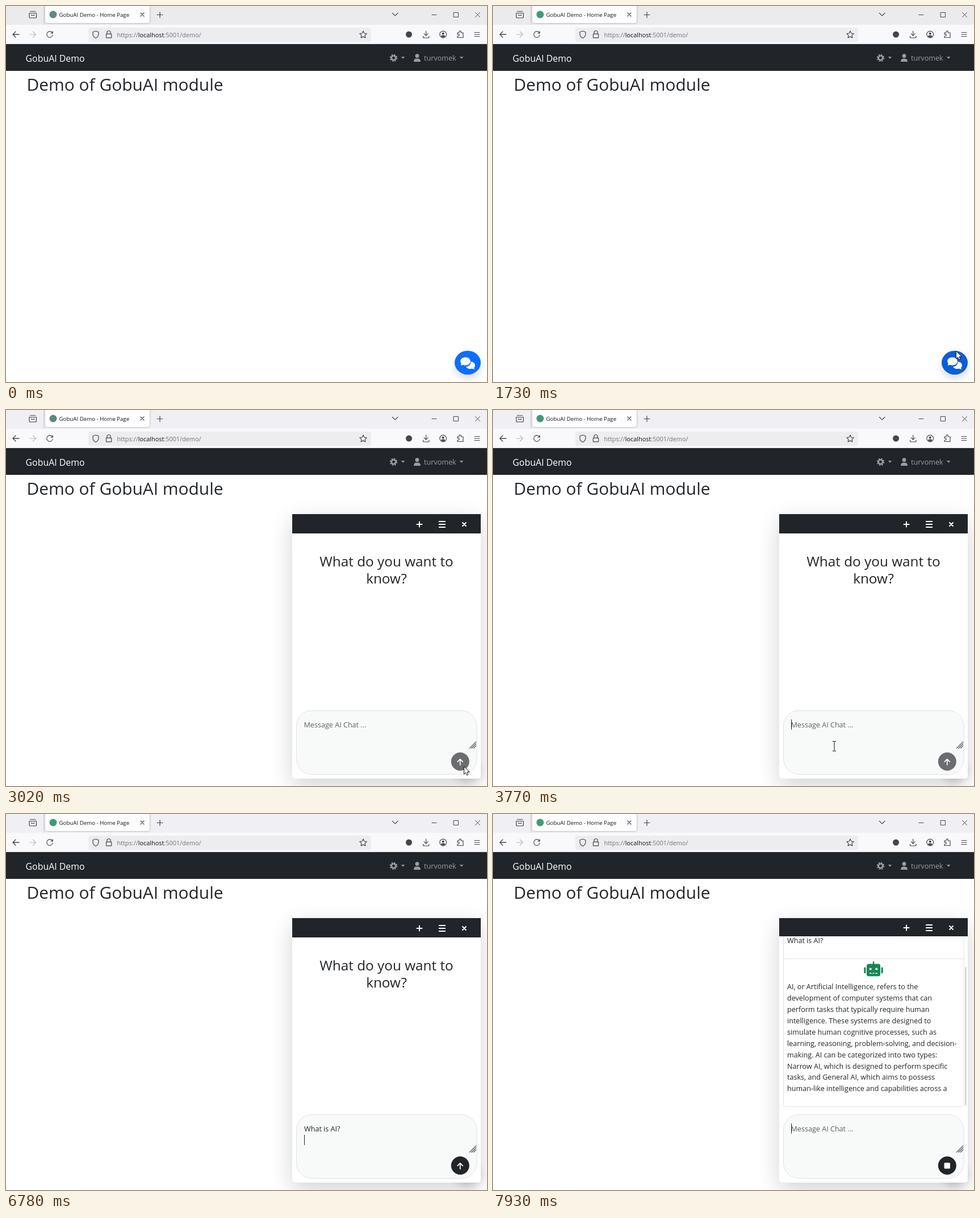
Write an HTML page that moves like this. It is 847 px wide and 661 px high and loops after 8 s.

```html
<!DOCTYPE html>
<html lang="en">
<head>
<meta charset="utf-8">
<title>GobuAI Demo - Home Page</title>
<style>
html, body { margin: 0; width: 100%; height: 100%; overflow: hidden; background: #fff; }
#stage { position: absolute; inset: 0; overflow: hidden; font-family: "Open Sans", "Noto Sans", sans-serif; }
#stage > * { position: absolute; }
svg { display: block; }
#art { left: 0; top: 0; }
.strip { left: 0; top: 0; width: 847px; height: 33px; background: #ebebee; animation: strip 8s step-end infinite; }
.tab { left: 69px; top: -4px; width: 184px; height: 34px; border-radius: 4px; background: #fdfdfe; box-shadow: 0 0 3px rgba(0,0,0,.4); }
.tools { left: 0; top: 33px; width: 847px; height: 34px; background: #f9f9fb; }
.address { left: 145px; top: 38px; width: 498px; height: 25px; border-radius: 4px; background: #ededf0; }
.nav { left: 0; top: 67px; width: 847px; height: 47px; background: #212529; }
.fab { left: 790px; top: 606px; width: 46px; height: 42px; border-radius: 50%; background: #0d6efd;
  box-shadow: 0 7px 13px rgba(0,0,0,.15); animation: fab 8s linear infinite; }
.panel { left: 504px; top: 183px; width: 332px; height: 465px; border-radius: 0 0 5px 5px; background: #fff;
  box-shadow: 0 13px 40px rgba(0,0,0,.175); }
.panel, #chatbox { animation: open 8s step-end infinite; }
.ink { fill: none; stroke: #45454e; stroke-width: 1.2; stroke-linecap: round; stroke-linejoin: round; }
.mute { fill: #9b9d9f; }
.dark { fill: #212529; }
.body { font-size: 12.6px; }
#icon { fill: #3f9a78; animation: icon 8s step-end infinite; }
#pointer { animation: path 8s linear infinite; }
#arrow { animation: arrow 8s step-end infinite; }
#beam { animation: beam 8s step-end infinite; }
#typed { white-space: pre; }

@keyframes strip { 0% { background: #ebebee } 36% { background: #f0f0f4 } }
@keyframes icon { 0%, 36% { fill: #5f8784 } .875%, 38.625% { fill: #3f9a78 } }
@keyframes open { 0% { visibility: hidden } 36% { visibility: visible } }
@keyframes fab {
  0%, 17%, 26%, 27% { background: #0d6efd }
  19%, 24%, 29%, 99.9% { background: #0b5ed7 }
}
@keyframes path {
  0%, 12.2% { transform: translate(862px, 638px) }
  12.25% { transform: translate(845px, 637px) }
  16.5% { transform: translate(828px, 629px) }
  21.625%, 22.4% { transform: translate(815px, 606px) }
  24.4% { transform: translate(790px, 637px) }
  26.2% { transform: translate(747px, 643px) }
  27.4% { transform: translate(768px, 640px) }
  29.375%, 42.4% { transform: translate(806px, 626px) }
  43.75% { transform: translate(748px, 616px) }
  45.4% { transform: translate(650px, 597px) }
  47.125%, 48.8% { transform: translate(601px, 591px) }
  48.875%, 100% { transform: translate(613px, 590px) }
}
@keyframes arrow { 0% { visibility: visible } 42.875% { visibility: hidden } }
@keyframes beam { 0% { visibility: hidden } 42.875% { visibility: visible } 49.625% { visibility: hidden } }
</style>
</head>
<body>
<div id="stage">
  <div class="strip"></div>
  <div class="tab"></div>
  <div class="tools"></div>
  <div class="address"></div>
  <div class="nav"></div>
  <div class="fab">
    <svg width="46" height="42" viewBox="790 606 46 42" fill="#fff">
      <path d="M826 631.5c0 2-.8 3.6-2 4.9.4 1 1.2 1.6 1.9 2.1-1.8.2-3.7-.2-5.2-1-4.5 1.3-9-.2-10.7-3.3 5.2-.6 8.8-4.2 8.6-9 4.4.4 7.4 3.1 7.4 6.3Z"/>
      <path d="M809 617.500c5 0 8.900 3.100 8.900 7.100s-3.900 7.100-8.900 7.100c-1.700 0-3.200-.3-4.500-.9-1.300.7-2.800 1-4.300.9.9-.8 1.500-1.700 1.700-2.800-1.100-1.200-1.800-2.700-1.800-4.300 0-4 3.900-7.100 8.900-7.100Z"/>
    </svg>
  </div>
  <div class="panel"></div>

  <svg id="art" width="847" height="661" viewBox="0 0 847 661">
    <!-- browser window -->
    <path d="M66.500 0V33" stroke="#cbcbd2"/>
    <path d="M0 66.500H847" stroke="#e2e2e6"/>
    <g class="ink">
      <path d="M42.500 9.500H52M41 12.500H53.500V19q0 2-2 2H43q-2 0-2-2ZM45 15v1.500h4.500V15"/>
      <path d="M237 12l6 6m0-6l-6 6M266 15.500h10M271 10.500v10M680.500 12.500l4.700 4.700 4.700-4.700"/>
      <path d="M750 15.500h8M788.500 11.500h8v8h-8ZM826.500 11.500l8 8m0-8l-8 8" stroke-width="1"/>
      <path d="M23 50H12m5-5l-5 5 5 5" stroke-width="1.400"/>
      <path d="M41.500 50h11m-5-5l5 5-5 5" stroke="#b9b9c0"/>
      <path d="M81.600 47.200A5.300 5.300 0 1 0 82.300 51M82.300 44.500v3.500h-3.500"/>
      <path d="M158 44l5 1.800v3.700q0 4.500-5 7-5-2.500-5-7v-3.700Z"/>
      <path d="M178 49v-2.500a3 3 0 0 1 6 0V49M176.500 49.200h9.200v6.600h-9.200Z"/>
      <path d="M629 44l1.900 4 4.300.6-3.100 3 .7 4.300-3.800-2-3.800 2 .7-4.300-3.100-3 4.300-.6Z"/>
      <path d="M739.700 44v8m-3.500-3.300l3.500 3.500 3.500-3.500M734.500 53v1q0 2 2 2h6.500q2 0 2-2v-1"/>
      <circle cx="769.700" cy="50" r="5.900"/>
      <path d="M795 47h3v-1.500a1.700 1.700 0 0 1 3.400 0V47h3.600v8.500h-10V53h1.500a1.700 1.700 0 0 0 0-3.400H795Z"/>
      <path d="M825 46.500h9m-9 3.500h9m-9 3.500h9"/>
    </g>
    <circle cx="709.500" cy="50" r="5.500" fill="#45454e"/>
    <circle cx="769.700" cy="48.500" r="2" fill="#45454e"/>
    <path d="M766 53.500q0-2 2-2h3.400q2 0 2 2-3.700 3-7.400 0Z" fill="#45454e"/>
    <circle id="icon" cx="83" cy="15" r="6.500"/>
    <text x="93.500" y="19" font-size="9.700" fill="#15141a">GobuAI Demo - Home Page</text>
    <text x="195.500" y="54.500" font-size="10.900" fill="#737379">https://<tspan fill="#15141a">localhost</tspan>:5001/demo/</text>

    <!-- page -->
    <text x="34.500" y="98" font-size="15.900" fill="#fff">GobuAI Demo</text>
    <g fill="none" stroke="#9b9d9f">
      <circle cx="682.500" cy="91.300" r="3.700" stroke-width="2.500"/>
      <circle cx="682.500" cy="91.300" r="5.700" stroke-width="2" stroke-dasharray="2.400 2.077"/>
    </g>
    <g class="mute">
      <path d="M695.700 89.300h6.600l-3.300 3.500ZM798.800 89.300h6.600l-3.300 3.500Z"/>
      <circle cx="724" cy="87.700" r="3.400"/>
      <path d="M718 98q0-5.500 4.500-5.500h3q4.500 0 4.500 5.500Z"/>
      <text class="body" x="736" y="96">turvomek</text>
    </g>
    <text class="dark" x="36.500" y="149" font-size="29.850">Demo of GobuAI module</text>

    <!-- chat panel -->
    <g id="chatbox">
      <g id="hello" class="dark" font-size="24.300" text-anchor="middle">
        <text x="670" y="275">What do you want to</text>
        <text x="670" y="305">know?</text>
      </g>
      <svg x="504" y="183" width="332" height="340" viewBox="504 183 332 340">
        <g id="talk">
          <rect id="card" x="511.500" y="223.500" width="317.500" rx="4" fill="#fff" stroke="#dee2e6"/>
          <g fill="#0d6efd">
            <circle cx="656" cy="233.700" r="6.700"/>
            <path d="M644 252.500q0-9 9.300-9h5.400q9.300 0 9.300 9 0 1.500-1.500 1.500h-21q-1.500 0-1.500-1.500Z"/>
          </g>
          <path d="M811 230h5.500l3 3v8q0 1.300-1.300 1.300H811q-1.300 0-1.300-1.300v-9.700q0-1.300 1.300-1.300Z" fill="#6c757d"/>
          <path d="M808.300 235h-2.600v10.200h8.600v-1.700" fill="none" stroke="#6c757d" stroke-width="1.800"/>
          <text class="body dark" x="518" y="276">What is AI?</text>
          <g id="bot">
            <path d="M511.500 303.500H829" stroke="#dee2e6"/>
            <g fill="#198754">
              <rect x="658" y="312.500" width="24" height="21.700" rx="3.500"/>
              <rect x="668.800" y="308" width="2.400" height="6" rx="1"/>
              <rect x="653.300" y="318.500" width="3.200" height="10.500" rx="1.200"/>
              <rect x="683.500" y="318.500" width="3.200" height="10.500" rx="1.200"/>
            </g>
            <circle cx="664.700" cy="321.500" r="2.100" fill="#fff"/>
            <circle cx="675.300" cy="321.500" r="2.100" fill="#fff"/>
            <path d="M663.200 329h3.300m2 0h3m2 0h3.300" stroke="#fff" stroke-width="1.600"/>
          </g>
          <g id="lines" class="body dark"></g>
        </g>
      </svg>
      <rect id="bar" x="831.500" y="269" width="2" height="243" rx="1" fill="#c4c6c8"/>
      <rect id="head" class="dark" x="504" y="183" width="332"/>
      <path id="tools" d="M728 195.700v10.600M722.700 201h10.600M762 196h12m-12 5h12m-12 5h12M803.500 197.500l7 7m0-7l-7 7" stroke="#fff" stroke-width="2"/>
      <rect x="511.500" y="528.500" width="317.500" height="112" rx="27" fill="#f8faf9" stroke="#dee2e6"/>
      <path d="M816 595l12-12m-8.500 12l8.500-8.500m-5 8.500l5-5" stroke="#4c5053" stroke-width="1.100"/>
      <text id="hint" class="body" x="524.500" y="558" fill="#5c6164">Message AI Chat ...</text>
      <text id="typed" class="body dark" x="525" y="558"></text>
      <rect id="caret" class="dark" width="1" height="18"/>
      <circle id="send" cx="799.800" cy="618" r="16"/>
      <path id="up" d="M799.700 624v-10m-4.500 4.300l4.500-4.500 4.500 4.500" fill="none" stroke="#fff" stroke-width="1.700" stroke-linecap="round" stroke-linejoin="round"/>
      <rect id="stop" x="794.500" y="613" width="10.400" height="10.400" rx="1.500" fill="#fff"/>
    </g>

    <g id="pointer">
      <path id="arrow" d="M.5.500V14.300L3.600 11.400 5.700 16 8 15 6 10.500H10.300Z" fill="#fff" stroke="#111"/>
      <path id="beam" d="M-3-8.500h2.500L0-8 .5-8.500H3M0-8V8M-3 8.500h2.500L0 8l.5.500H3" fill="none" stroke="#111"/>
    </g>
  </svg>
</div>
<script>
const LOOP = 8000, SENT = 6910;
const $ = id => document.getElementById(id);
const show = (id, on) => { $(id).style.display = on ? '' : 'none'; };
const within = (t, spans) => spans.some(([a, b]) => t >= a && t < b);

const question = 'What is AI?';
const keyTimes = [4830, 5030, 5160, 5300, 5630, 5700, 5830, 5900, 6050, 6120, 6380, 6780];
const caretX = [525, 537, 545, 552, 556, 560, 563, 568, 572, 580, 584, 590, 525];
const caretOn = [[3770, 4310], [4830, 5360], [5630, 6450], [6780, LOOP]];

const answer = [
  'AI, or Artificial Intelligence, refers to the',
  'development of computer systems that can',
  'perform tasks that typically require human',
  'intelligence. These systems are designed to',
  'simulate human cognitive processes, such as',
  'learning, reasoning, problem-solving, and decision-',
  'making. AI can be categorized into two types:',
  'Narrow AI, which is designed to perform specific',
  'tasks, and General AI, which aims to possess',
  'human-like intelligence and capabilities across a'
].map(line => line.split(' '));

// [time, words received so far]
const stream = [[7050, 1], [7120, 4], [7190, 7], [7250, 10], [7310, 13], [7380, 15],
  [7460, 17], [7540, 19], [7600, 31], [7660, 43], [7860, 52], [7930, 67]];

const rows = answer.map((_, i) => {
  const row = document.createElementNS('http://www.w3.org/2000/svg', 'text');
  row.setAttribute('x', 518);
  row.setAttribute('y', 357 + 19.93 * i);
  return $('lines').appendChild(row);
});

function drawTalk(t) {
  let left = stream.reduce((n, [at, words]) => t >= at ? words : n, 0);
  let used = 0;
  answer.forEach((words, i) => {
    const n = Math.min(left, words.length);
    rows[i].textContent = words.slice(0, n).join(' ');
    left -= n;
    if (n) used = i + 1;
  });
  const bot = t >= 6980;
  const height = bot ? 140 + 20 * Math.max(used, 1) : 80;
  const scroll = Math.max(0, height - 291);
  show('bot', bot);
  $('card').setAttribute('height', height);
  $('talk').setAttribute('transform', `translate(0 ${-scroll})`);
  show('bar', scroll > 0);
  $('head').setAttribute('height', scroll ? 32 : 34);
  $('tools').setAttribute('transform', `translate(0 ${scroll ? -1 : 0})`);
}

function drawInput(t) {
  const sent = t >= SENT;
  const keys = sent ? 0 : keyTimes.filter(k => t >= k).length;
  $('typed').textContent = question.slice(0, keys);
  show('hint', !keys);
  show('caret', within(t, caretOn));
  $('caret').setAttribute('x', caretX[keys]);
  $('caret').setAttribute('y', keys > question.length ? 564 : 544);
  $('send').setAttribute('fill', keys || sent ? '#212529' : '#6b6d70');
  show('up', !sent);
  show('stop', sent);
  show('hello', !sent);
  show('talk', sent);
}

function render(t) {
  drawInput(t);
  drawTalk(t);
}

const start = performance.now();
function tick() {
  render((performance.now() - start) % LOOP);
  requestAnimationFrame(tick);
}
tick();
</script>
</body>
</html>
```
